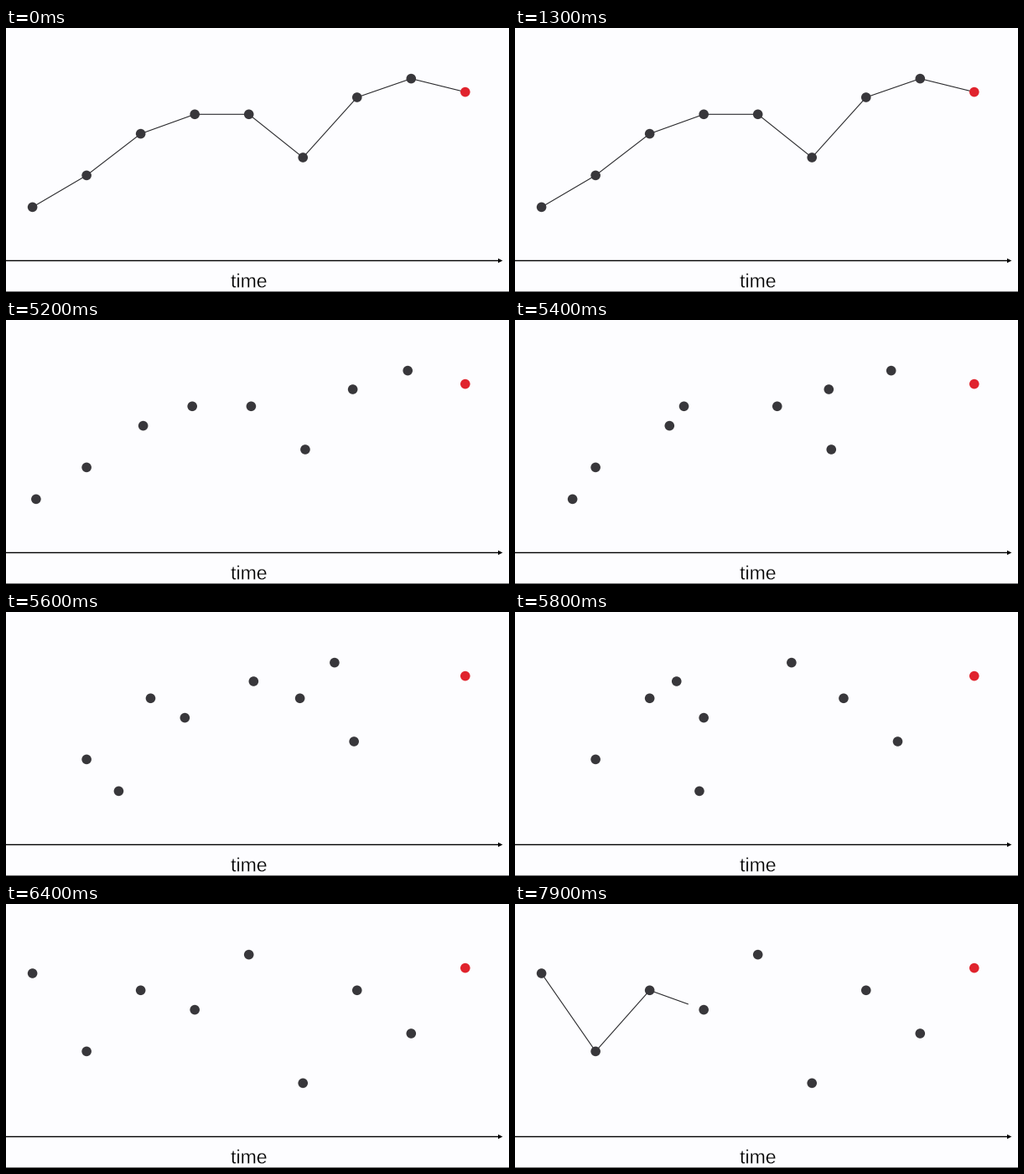
Write a matplotlib script that moves like this. It is 600 px wide and 316 px high and loops after 8 s.

```python
import numpy as np
import matplotlib.pyplot as plt
from matplotlib.animation import FuncAnimation
from matplotlib.patches import Polygon, Rectangle
from matplotlib.patheffects import Stroke

W, H, DPI = 600, 316, 100
STEP, LOOP = 100, 8000
PX = 72 / DPI  # points per pixel

PAPER, DARK, RED, INK = "#fdfdff", "#38373b", "#e0232d", "#000000"

# Evenly spaced time slots; each dot keeps its height and moves to a new slot
SLOTS = np.linspace(31.6, 547.8, 9)
HEIGHTS = np.array([214.4, 176.4, 126.6, 103.3, 103.3, 155, 83, 60.6, 76.6])
ORDER = np.array([5, 1, 3, 2, 6, 7, 0, 4, 8])

LINES_OFF, SWAP_ON, DRAW_ON, DRAW_TIME = 2900, 5200, 7160, 1985
SWAP_START = 5075

# Longer hops take longer, in three classes
hops = abs(ORDER - np.arange(9)).clip(1)
SWAP_TIME = 700 * np.sqrt(1 + np.floor(np.log2(hops)))


def ease(u):
    return (1 - np.cos(np.pi * np.clip(u, 0, 1))) / 2


def dots_at(t):
    x = SLOTS
    if t >= SWAP_ON:
        u = ((t - SWAP_START) / SWAP_TIME) ** 1.15
        x = SLOTS + (SLOTS[ORDER] - SLOTS) * ease(u)
    return np.column_stack([x, HEIGHTS])


def partial(path, share):
    """The first part of a polyline, cut at a share of its length."""
    run = np.concatenate([[0], np.cumsum(np.hypot(*np.diff(path, axis=0).T))])
    cut = share * run[-1]
    tip = [np.interp(cut, run, path[:, k]) for k in (0, 1)]
    return np.vstack([path[run < cut], tip])


def line_at(t):
    if t < LINES_OFF:
        return dots_at(t)
    if t > DRAW_ON:
        path = np.column_stack([SLOTS, HEIGHTS[ORDER.argsort()]])
        return partial(path, ease((t - DRAW_ON) / DRAW_TIME))
    return np.empty((0, 2))


fig = plt.figure(figsize=(W / DPI, H / DPI), dpi=DPI, facecolor=PAPER)
ax = fig.add_axes([0, 0, 1, 1])
ax.set(xlim=(0, W), ylim=(H, 0))
ax.axis("off")

# Time axis, caption and bottom edge
AXIS_Y = 278.5
ax.plot([-2, 588], [AXIS_Y] * 2, color=INK, lw=1.4 * PX, snap=False)
ax.add_patch(Polygon([(587, AXIS_Y - 2.7), (592.4, AXIS_Y), (587, AXIS_Y + 2.7)],
                     fc=INK, lw=0))
ax.add_patch(Rectangle((0, H - 1), W, 1, fc="#777779", lw=0, snap=False))
ax.text(289.8, 310.5, "time", ha="center", va="baseline", color=INK,
        family="Liberation Sans", size=23 * PX,
        path_effects=[Stroke(linewidth=.3 * PX, foreground=PAPER)])

link, = ax.plot([], [], color="#29292c", lw=1.1 * PX, solid_joinstyle="round",
                solid_capstyle="butt", zorder=3)
dots = ax.scatter(SLOTS, HEIGHTS, s=(11.6 * PX) ** 2, c=[DARK] * 8 + [RED],
                  linewidths=0, zorder=4)


def draw(i):
    t = i * STEP
    dots.set_offsets(dots_at(t))
    link.set_data(*line_at(t).T)
    return dots, link


anim = FuncAnimation(fig, draw, frames=LOOP // STEP, interval=STEP, repeat=True)
plt.show()
```
